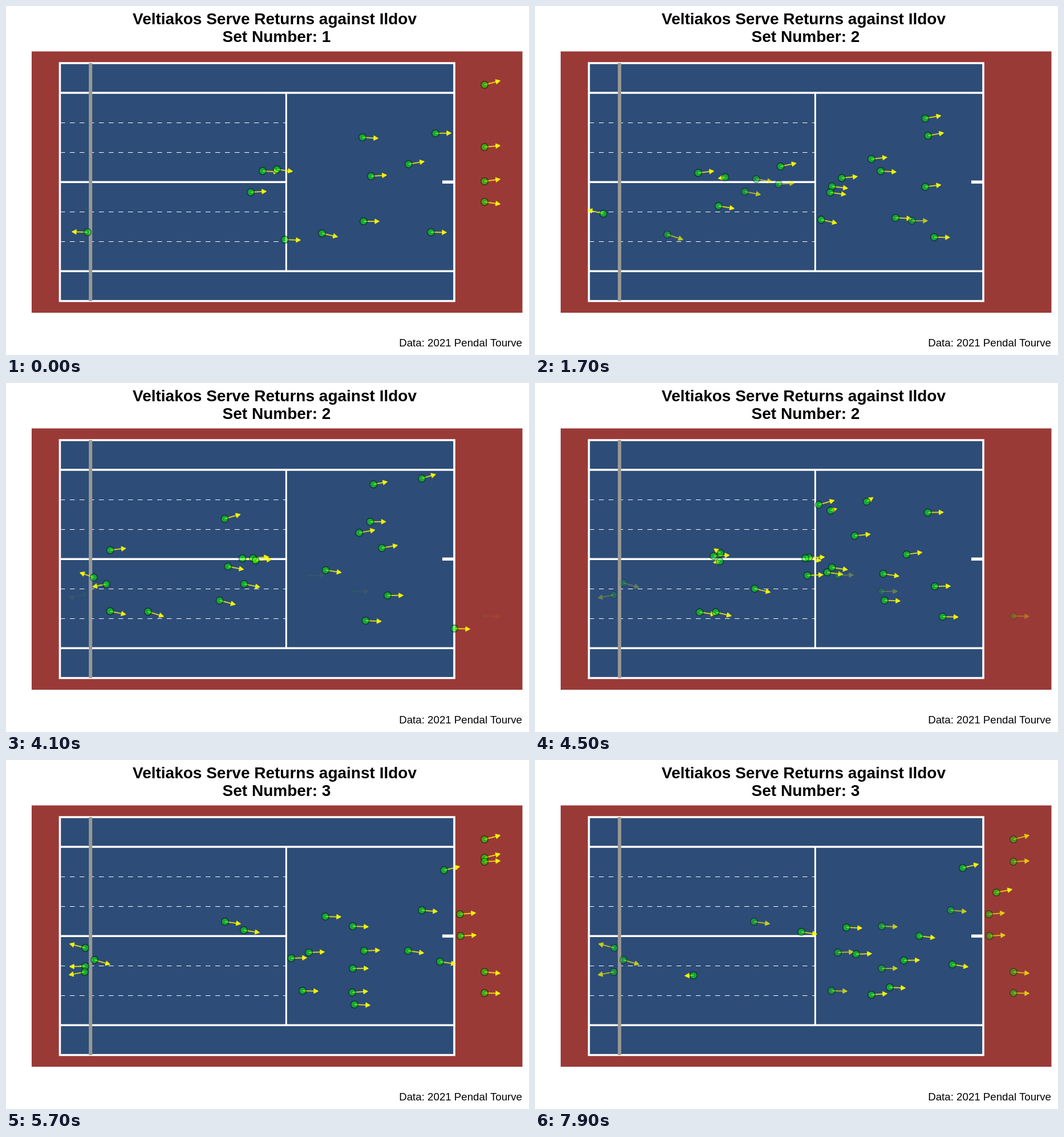
Write an HTML page that moves like this. It is 917 px wide and 611 px high and loops after 8000 ms.

```html
<!DOCTYPE html>
<html lang="en">
<head>
<meta charset="utf-8">
<title>Serve returns</title>
<style>
  html, body { margin: 0; width: 100%; height: 100%; overflow: hidden; background: #fff; }
  svg { display: block; width: 917px; height: 611px; font-family: "Liberation Sans", Arial, sans-serif; }
  .title { font-size: 28px; font-weight: bold; text-anchor: middle; }
  .court { fill: none; stroke: #fff; stroke-width: 3.6; }
  .thin { fill: none; stroke: #fff; stroke-width: 1; stroke-dasharray: 8.5 8.5; }
  .shaft { stroke: #ff0; stroke-width: 2; stroke-opacity: .75; }
  .head { fill: #ff0; stroke: #ff0; stroke-width: 1.6; stroke-linejoin: round; fill-opacity: .85; stroke-opacity: .75; }
  .ball { fill: #0f0; stroke: #000; stroke-width: 1.5; fill-opacity: .5; stroke-opacity: .5; }
</style>
</head>
<body>
<svg viewBox="0 0 917 611">
  <text class="title" x="471" y="32">Veltiakos Serve Returns against Ildov</text>
  <text class="title" x="474.5" y="63" id="label"></text>
  <text x="905" y="596" font-size="18.7" text-anchor="end">Data: 2021 Pendal Tourve</text>
  <rect x="45" y="79.5" width="860.5" height="457.5" fill="#9a3a37"/>
  <rect x="94.5" y="100" width="691.5" height="416.5" fill="#2d4c77"/>
  <path class="thin" d="M95 204.5H491M95 256.5H491M95 360.5H491M95 412.5H491"/>
  <path class="court" d="M94.5 100H786V516.5H94.5ZM95 152H786M95 464.3H786M95 308.2H491"/>
  <path class="court" style="stroke-width:3" d="M491.3 152V464"/>
  <path class="court" style="stroke-width:5.4" d="M765 308.2H786"/>
  <path d="M148.2 100V516.5" stroke="#999894" stroke-width="6"/>
  <g id="arrows"></g>
  <g id="balls"></g>
</svg>
<script>
const LOOP = 8000, REACH = 27.6, OUT = 839; // OUT: where long balls are held

// Arrows lie on the line from the returner, who stands in one of four lanes.
const lanes = { a: 160, b: 248, c: 378, d: 494 }, RETURNER_X = -500;

// A ball keeps its index from set to set; surplus balls fade where they stand.
const first = balls("cdaadcccbbdcacac", [
  [143,396], [OUT,138], [625,230], [OUT,343], [706,277], [429,326], [745,396], [640,298],
  [450,289], [753,223], [OUT,307], [OUT,247], [475,286], [489,409], [554,398], [627,377]]);
const second = balls("adcaccdcabcaddbdacaac", [
  [111,351], [139,362], [635,425], [372,386], [676,166], [804,435], [661,286], [150,290],
  [548,326], [156,399], [422,299], [394,357], [634,261], [766,157], [626,247], [355,244],
  [388,303], [427,312], [368,325], [232,400], [661,376]]);
const third = balls("ddbacccaadccaabdbbaccadccc", [
  [OUT,171], [768,193], [560,274], [417,298], [139,361], [500,347], [628,334], [705,334],
  [761,353], [607,407], [611,428], [796,270], [384,283], [139,329], [OUT,178], [OUT,139],
  [OUT,371], [608,291], [729,263], [520,404], [797,308], [155,350], [138,371], [531,337],
  [608,365], [OUT,408]]);
const fourth = balls("ddbacccaadb", [
  [704,445], [687,175], [497,360], [642,311], [764,433], [783,315], [713,410], [565,217],
  [630,375], [530,425], [660,293]]);

// Start in ms, number of 100 ms steps, and the sets at both ends.
const moves = [
  { start: 500, steps: 18, from: first, to: second },
  { start: 4100, steps: 17, from: second, to: third },
  { start: 7600, steps: 18, from: third, to: fourth }
];

const $ = id => document.getElementById(id);
const mix = (a, b, p) => a + (b - a) * p;

function balls(stances, spots) {
  return spots.map(([x, y], i) => {
    const dx = x < 145 ? -REACH : REACH; // netted balls point back
    return [x, y, dx, dx * (y - lanes[stances[i]]) / (x - RETURNER_X)];
  });
}

function arrow(x, y, dx, dy, alpha) {
  const len = Math.hypot(dx, dy), turn = Math.atan2(dy, dx) * 180 / Math.PI;
  return `<g transform="translate(${x} ${y}) rotate(${turn})" opacity="${alpha}">
    <path class="shaft" d="M0 0H${len - 1}"/>
    <path class="head" d="M${len - .6} 0l-7 -3.8v7.6z"/></g>`;
}

function draw(t) {
  const s = t < moves[1].start ? 0 : t < moves[2].start ? 1 : 2;
  const { start, steps, from, to } = moves[s];
  const step = Math.max(0, Math.min(steps, Math.floor((t - start) / 100) + 1));
  const p = step / steps;
  let arrows = "", dots = "";
  for (let i = 0; i < Math.max(from.length, to.length); i++) {
    const a = from[i] || to[i], b = to[i] || from[i];
    const alpha = !from[i] ? p : !to[i] ? 1 - p : 1;
    if (!alpha) continue;
    const [x, y, dx, dy] = a.map((v, j) => mix(v, b[j], p));
    arrows += arrow(x, y, dx, dy, alpha);
    dots += `<circle class="ball" cx="${x}" cy="${y}" r="6.2" opacity="${alpha}"/>`;
  }
  $("arrows").innerHTML = arrows;
  $("balls").innerHTML = dots;
  $("label").textContent = "Set Number: " + (s + (step > 9 ? 2 : 1));
}

const begin = performance.now();
function tick() {
  draw((performance.now() - begin) % LOOP);
  requestAnimationFrame(tick);
}
tick();
</script>
</body>
</html>
```
